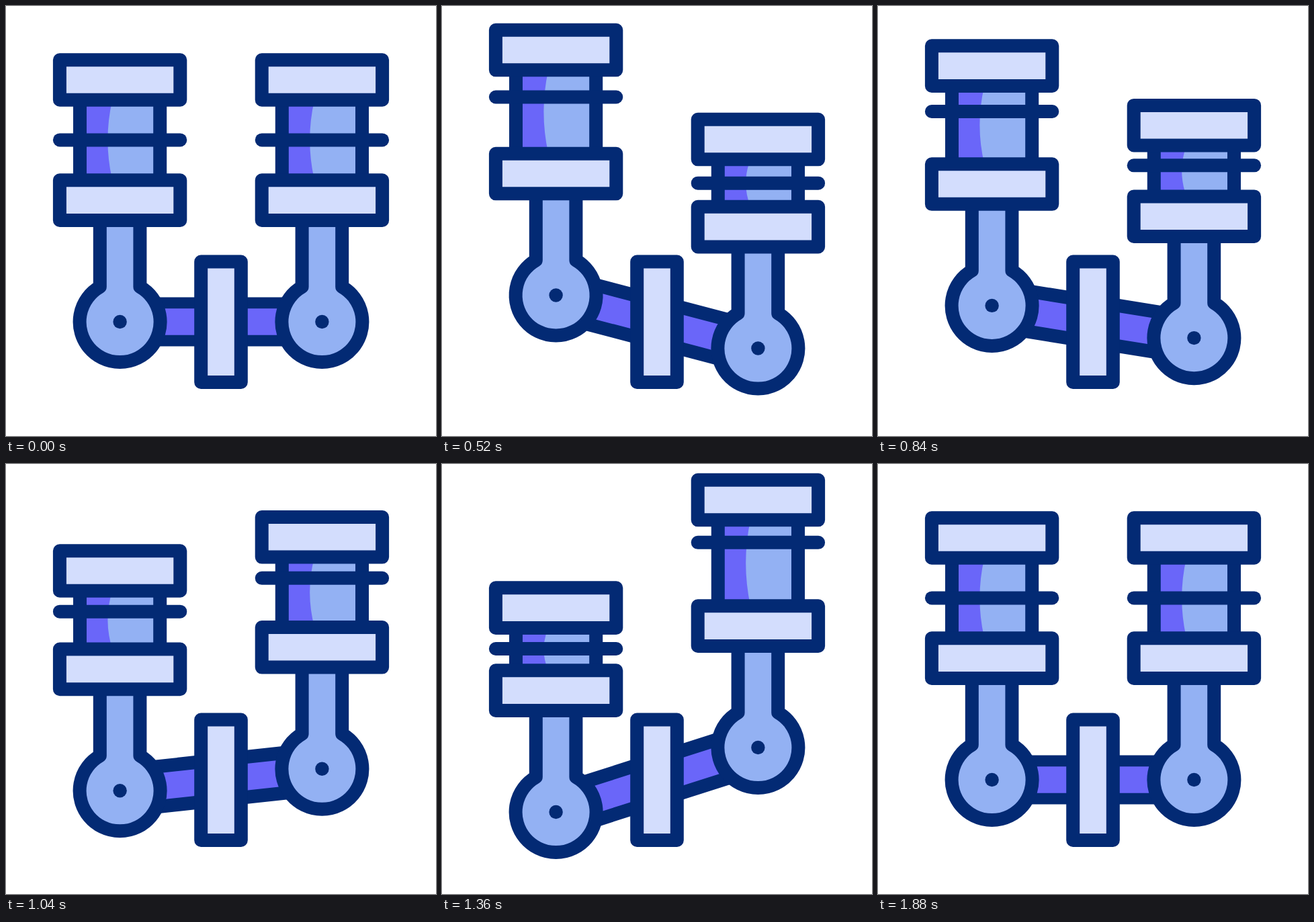
Write an HTML page that moves like this. It is 640 by 640 pixels and loops after 2 s.

```html
<!DOCTYPE html>
<html lang="en">
<head>
<meta charset="utf-8">
<title>Pistons</title>
<style>
  html, body { margin: 0; width: 100%; height: 100%; overflow: hidden; background: #fff; }
  svg { display: block; width: 100vw; height: 100vh; }
  .line { stroke: #032a74; stroke-width: 20; stroke-linecap: round; stroke-linejoin: round; fill: none; }
  .butt { stroke-linecap: butt; }
  .pale { fill: #d3ddfd; }
  .blue { fill: #93b1f3; }
  .violet { fill: #6a66f9; }
  .navy { fill: #032a74; }
</style>
</head>
<body>
<svg viewBox="0 0 640 640">
  <defs>
    <rect id="cap" class="line pale" x="-89.7" width="179.4" height="59.6"/>
    <g id="rod">
      <path class="line blue" d="M-29.8-151V-52A60 60 0 1 0 29.8-52V-151"/>
      <circle class="navy" r="10.2"/>
    </g>
  </defs>
  <g id="crank">
    <rect class="violet" x="-115" y="-22" width="230" height="44"/>
    <path class="line butt" id="rails"/>
  </g>
  <g id="pistons"></g>
  <rect class="line pale" x="290.2" y="380.6" width="59.6" height="179.4"/>
</svg>
<script>
const LOOP = 2000, STEP = 40;
const START = 120, PEAK1 = 640, PEAK2 = 1280, END = 1880;

function bezier(x1, x2) {
  // Cubic easing with level handles at both ends.
  return x => {
    let lo = 0, hi = 1;
    for (let i = 0; i < 30; i++) {
      const s = (lo + hi) / 2, r = 1 - s;
      if (3 * x1 * s * r * r + 3 * x2 * s * s * r + s * s * s < x) lo = s;
      else hi = s;
    }
    return lo * lo * (3 - 2 * lo);
  };
}

const lift = bezier(0.4, 0.784);
const swap = bezier(0.24, 0.76);
const settle = bezier(0.4, 0.516);

// Offset from rest: first peak, opposite peak, back to rest.
function track(first, second, middle = swap) {
  return t => {
    if (t <= START || t >= END) return 0;
    if (t < PEAK1) return first * lift((t - START) / (PEAK1 - START));
    if (t < PEAK2) return first + (second - first) * middle((t - PEAK1) / (PEAK2 - PEAK1));
    return second * (1 - settle((t - PEAK2) / (END - PEAK2)));
  };
}

const sides = [
  {
    x: 169.6,
    top: track(-56.2, 108.5, bezier(0.333, 0.74)),
    ring: track(-80.8, 78.7, bezier(0.253, 0.804)),
    rod: track(-50, 50)
  },
  {
    x: 470.4,
    top: track(112, -58.8),
    ring: track(81.3, -86),
    rod: track(50, -50)
  }
];

const pistons = document.getElementById('pistons');
const crank = document.getElementById('crank');
const rails = document.getElementById('rails');

for (const side of sides) {
  const group = document.createElementNS('http://www.w3.org/2000/svg', 'g');
  group.setAttribute('transform', `translate(${side.x} 0)`);
  group.innerHTML = `
    <use href="#rod"/>
    <path class="blue"/>
    <path class="violet"/>
    <path class="line butt"/>
    <path class="line" d="M-89.7 0H89.7"/>
    <use href="#cap"/>
    <use href="#cap"/>`;
  pistons.append(group);
  side.parts = [...group.children];
}

const moveY = (part, y) => part.setAttribute('transform', `translate(0 ${y})`);

function drawPiston(side, t) {
  const [rod, body, shade, walls, ring, head, foot] = side.parts;
  const rodY = 470 + side.rod(t);
  const headY = 80.2 + side.top(t);
  const footY = rodY - 210.7;
  const y1 = headY + 59.6, y2 = footY;
  moveY(rod, rodY);
  moveY(head, headY);
  moveY(foot, footY);
  moveY(ring, 199.4 + side.ring(t));
  body.setAttribute('d', `M-59.6 ${y1}H59.6V${y2}H-59.6Z`);
  shade.setAttribute('d', `M-59.6 ${y1}H-11.3Q-25.1 ${(y1 + y2) / 2} -11.3 ${y2}H-59.6Z`);
  walls.setAttribute('d', `M-59.6 ${y1}V${y2}M59.6 ${y1}V${y2}`);
}

function drawCrank(t) {
  const angle = Math.atan2(sides[1].rod(t), 150.4) * 180 / Math.PI;
  const weight = 16.8 + 3.2 * Math.min(1, Math.abs(angle) / 5);
  const y = 19.8 + weight / 2;
  crank.setAttribute('transform', `translate(320 470) rotate(${angle})`);
  rails.setAttribute('d', `M-115 ${-y}H115M-115 ${y}H115`);
  rails.style.strokeWidth = weight;
}

function draw() {
  const t = Math.floor(performance.now() % LOOP / STEP) * STEP;
  sides.forEach(side => drawPiston(side, t));
  drawCrank(t);
  requestAnimationFrame(draw);
}
draw();
</script>
</body>
</html>
```
